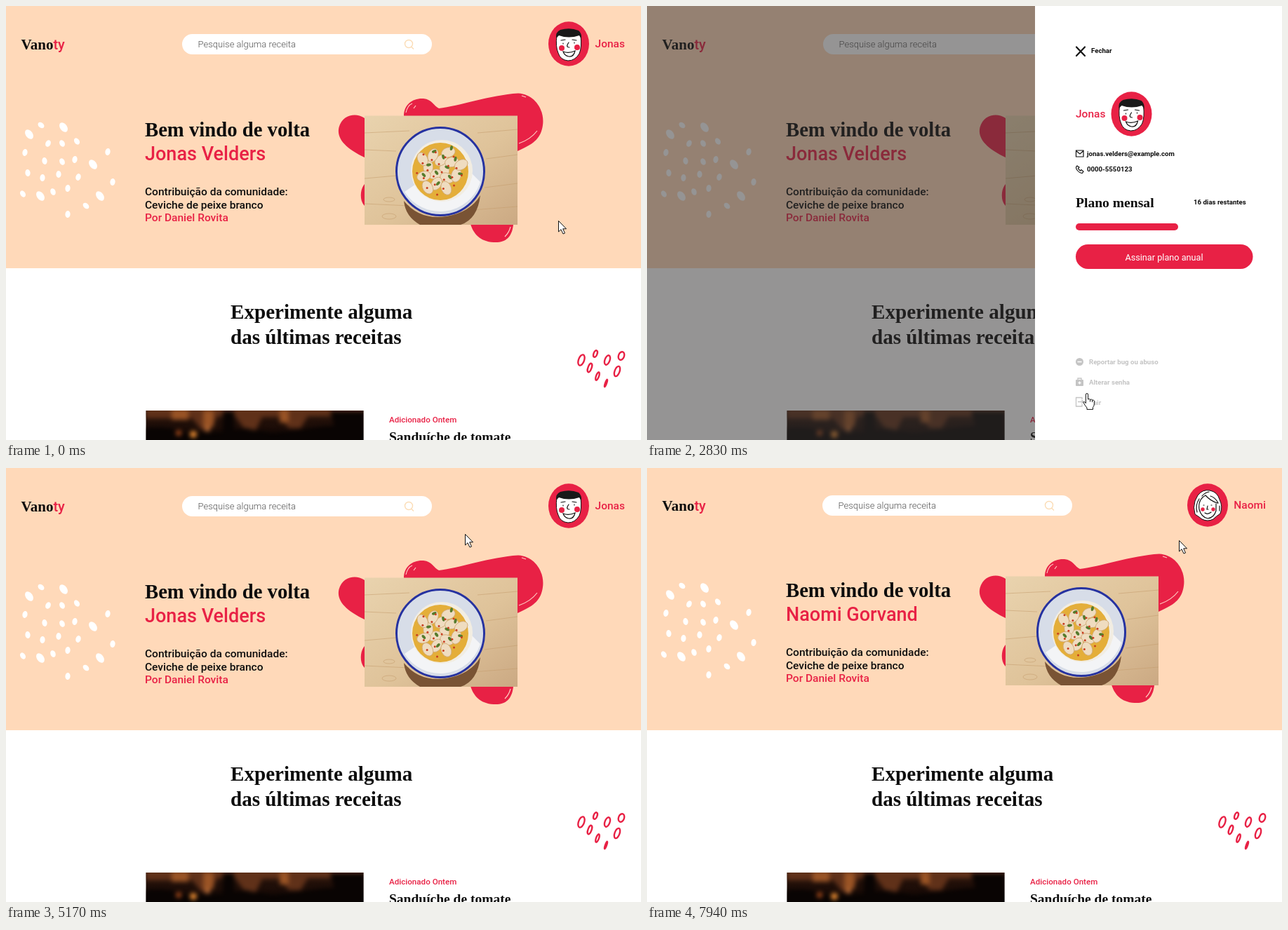
Animation of 905 by 619 pixels, one loop 8 s. Source, as an HTML page:

```html
<!DOCTYPE html>
<html lang="pt">
<head>
<meta charset="utf-8">
<style>
  html, body { margin: 0; width: 100%; height: 100%; overflow: hidden; background: #fff }
  svg { display: block; font-family: Roboto, sans-serif; font-weight: 500; fill: #0d0d0d }
  .serif { font-family: "Liberation Serif", serif; font-weight: 700 }
  .red { fill: #e82145 }
  .body { font-size: 15.5px }
  .small { font-size: 9.65px; font-weight: 700 }
  .line { fill: none; stroke: #111; stroke-width: 1.2; stroke-linecap: round }
</style>
</head>
<body>
<svg width="905" height="619" viewBox="0 0 905 619">
  <defs>
    <g id="man">
      <ellipse class="red" rx="29" ry="31.7"/>
      <path fill="#fff" stroke="#111" d="M-17-12Q0-18 17-12Q19 5 15 14Q9 24-1 24Q-12 23-15 13Q-19 4-17-12Z"/>
      <path fill="#191919" d="M-18-8Q-19-17-12-20Q2-24 14-19Q19-15 18-7L15-12Q0-7-14-12Z"/>
      <g class="red"><circle cx="-10" cy="6" r="4"/><circle cx="12" cy="5" r="4"/></g>
      <path class="line" d="M-11-5L-5-6M5-6L11-5M-8-1V0M8-2V-1M0-2Q-5 5 1 5M-8 11Q0 14 9 10Q7 19 0 18Q-6 17-8 11Z"/>
    </g>
    <g id="woman">
      <ellipse class="red" rx="29" ry="30.7"/>
      <path fill="#fff" stroke="#111" d="M-14-14Q-7-23 3-21Q14-19 17-8Q22 2 18 12Q12 16 8 20Q0 24-8 20Q-13 16-18 13Q-21 3-18-6Z"/>
      <path class="line" stroke-width=".9" d="M-12 6Q-14-8-3-14Q4-6 14-3M12-2V8Q9 18 0 19Q-9 17-12 6M-15 10Q-18 0-12-9M-8-13Q-4-18 2-19M4-13Q11-11 15-3M17 8V1M-6 0H-5M5 0H6M0 1L-1 6H1M-4 11Q0 14 5 10"/>
      <g class="red"><circle cx="-7" cy="6" r="2.7"/><circle cx="8" cy="6" r="2.7"/></g>
    </g>
    <linearGradient id="wood" x2="1" y2="1">
      <stop stop-color="#e9d3ae"/><stop offset=".55" stop-color="#dfc39a"/><stop offset="1" stop-color="#cba983"/>
    </linearGradient>
    <linearGradient id="night" x2="0" y2="1">
      <stop stop-color="#2b150c"/><stop offset=".6" stop-color="#1b0c07"/><stop offset="1" stop-color="#050202"/>
    </linearGradient>
    <clipPath id="photoClip"><path d="M511 156.500H729V312H511Z"/></clipPath>
    <clipPath id="cardClip"><path d="M199.500 577H509.500V619H199.500Z"/></clipPath>
  </defs>

  <path fill="#ffd9b9" d="M0 0H905V374H0Z"/>

  <g id="header">
    <text class="serif" x="21.500" y="62" font-size="21">Vano<tspan class="red" font-family="Roboto, sans-serif" font-weight="500" font-size="20">ty</tspan></text>
    <g id="search">
      <rect x="251" y="40" width="356" height="29" rx="14.500" fill="#fff"/>
      <text x="273.500" y="59.300" font-size="13" font-weight="300" fill="#555">Pesquise alguma receita</text>
      <path fill="none" stroke="#fbdcb5" stroke-width="1.400" d="M568.500 54a5.500 5.500 0 1 0 11 0a5.500 5.500 0 1 0-11 0M578 58.500L581 61.500"/>
    </g>
    <text id="shortName" class="red body" x="882" y="59.300" text-anchor="end"></text>
  </g>
  <use id="manTop" href="#man" x="802" y="54"/>
  <use id="womanTop" href="#woman" x="799" y="53"/>

  <g id="hero">
    <g id="dots" fill="#fff"></g>
    <text class="serif" x="198" y="186" font-size="28.700">Bem vindo de volta</text>
    <text id="fullName" class="red" x="198" y="219.500" font-size="27"></text>
    <g class="body">
      <text x="198" y="270">Contribuição da comunidade:</text>
      <text x="198" y="288.500">Ceviche de peixe branco</text>
      <text x="198" y="307" class="red">Por Daniel Rovita</text>
    </g>
    <path class="red" d="M511 216C490 206 470 192 474.500 173C480 154 500 152 511 160L567 157C567 140 580 131 595 132C607 133 610 143 617 146C645 143 690 127 730 124.500C755 126 768 150 765 170C762 192 748 198 729 207V300L723 312C721 330 712 338 695 337C675 336 666 324 662 311L511 285C504 278 504 262 511 254Z"/>
    <path fill="none" stroke="#ffc9c0" stroke-width="1.200" d="M570 152Q572 142 579 139M581 146L584 142M731 196Q748 190 757 178M735 128L741 130M711 329Q717 323 719 315"/>
    <g clip-path="url(#photoClip)">
      <path fill="url(#wood)" d="M511 156H729V312H511Z"/>
      <g fill="none" stroke="#c39c6c" stroke-opacity=".55">
        <path d="M511 181L575 178M672 181L729 176M511 205L556 207M684 218L729 212M511 246L556 242M682 259L729 253M511 282L575 285M664 291L729 286"/>
        <ellipse cx="546" cy="276" rx="8" ry="3"/><ellipse cx="546" cy="300" rx="10" ry="4"/>
      </g>
      <path fill="#795334" d="M567 278Q590 306 628 300Q662 294 676 270Q672 304 648 312H590Q569 300 567 278Z"/>
      <circle cx="619" cy="236" r="62.500" fill="#d7dde8" stroke="#2632a0" stroke-width="3"/>
      <path fill="#f3f4f6" d="M568 265A60 60 0 0 0 676 251L664 239A44 44 0 0 1 584 254Z"/>
      <circle cx="621" cy="235" r="44" fill="#f2ede2"/>
      <ellipse cx="619" cy="236" rx="40" ry="41" fill="#e4ae39"/>
      <g id="food"></g>
    </g>
  </g>

  <g class="serif" font-size="29.100">
    <text x="320" y="446">Experimente alguma</text>
    <text x="320" y="482">das últimas receitas</text>
  </g>
  <g id="rings" fill="none" stroke="#e82145"></g>

  <g clip-path="url(#cardClip)">
    <path fill="url(#night)" d="M199 577H510V619H199Z"/>
    <g style="filter: blur(3px)">
      <path fill="#603119" d="M199 572H510V585H430L420 602H403L390 586H365L356 605H341L327 585H301L291 604H278L266 588H199Z"/>
      <path fill="#9a5425" d="M236 576H260V590H236ZM281 577H296V600H281ZM390 576H403V594H390Z"/>
      <path fill="#090403" d="M199 602Q240 598 258 613L310 609L342 602L380 611L450 600L510 596V625H199ZM309 578H325V617H309ZM462 578H510V610H471Z"/>
      <circle cx="267" cy="611" r="5" fill="#e98b32"/><circle cx="246" cy="609" r="4" fill="#a64a1b"/><circle cx="287" cy="603" r="4" fill="#b66b37"/>
    </g>
  </g>
  <text class="red" x="546" y="594" font-size="11.600">Adicionado Ontem</text>
  <text class="serif" x="546" y="620.500" font-size="19.500">Sanduíche de tomate</text>

  <g id="panel">
    <path fill="#343232" fill-opacity=".52" d="M0 0H553V619H0Z"/>
    <path fill="#fff" d="M553 0H905V619H553Z"/>
    <path class="line" style="stroke-width: 2.200" d="M612 58.500L624 71M624 58.500L612 71"/>
    <text class="red body" x="611" y="159.300">Jonas</text>
    <use href="#man" x="690.500" y="154"/>
    <path class="line" d="M611.500 206H622V215H611.500ZM612 207L617 211L621.500 207M613 228Q610 230 613 234Q616 238 620 238.500L622 236L619 233.500L617.500 235Q615 233 614.500 231.500L616 230Z"/>
    <g class="small">
      <text x="633" y="67.300">Fechar</text>
      <text x="627" y="214">jonas.velders@example.com</text>
      <text x="627" y="236">0000-5550123</text>
      <text x="779" y="283">16 dias restantes</text>
      <g fill="#c4c4c4">
        <text x="630" y="511.300">Reportar bug ou abuso</text>
        <text x="630" y="539.800">Alterar senha</text>
        <text x="630" y="568.500">Sair</text>
        <circle cx="616.500" cy="507.500" r="5.500"/>
        <rect x="611" y="533" width="11" height="9" rx="1"/>
        <path fill="none" stroke="#c4c4c4" stroke-width="1.300" d="M614 533V531H619V533M620 561V558.500H611.500V571H620V568M614 564.500H622M619.500 562L622 564.500L619.500 567"/>
        <path stroke="#fff" stroke-width="1.500" d="M613.500 507.500H619.500M614.500 537.500H618.500M616.500 535.500V539.500"/>
      </g>
    </g>
    <text class="serif" x="611" y="286.500" font-size="19.600">Plano mensal</text>
    <rect class="red" x="611" y="310" width="146" height="10" rx="5"/>
    <rect class="red" x="611" y="340" width="252.500" height="35" rx="17.500"/>
    <text x="737" y="362.500" font-size="12.700" font-weight="400" fill="#fff" text-anchor="middle">Assinar plano anual</text>
  </g>

  <g id="cursor" fill="#fff" stroke="#111" stroke-linejoin="round">
    <path id="arrow" d="M.500.500V16L4 12.700L7 19L9.500 18L6.700 11.800H11.500Z"/>
    <path id="hand" d="M-1.600 14.500V2.200Q-1.600.600 0 .600T1.600 2.200V9Q3.300 7.500 4.600 9.300Q6.300 8.300 7.600 10Q9.300 9.300 10.400 11.200V16Q10 19 8.500 20.500V23.400H0V21Q-2.500 18.500-5 13.500Q-4.500 11-1.600 14.500ZM4.600 9.300V12.500M7.600 10V13"/>
  </g>
</svg>
<script>
const $ = id => document.getElementById(id);
const LOOP = 8000;

let seed = 7;
const rand = () => (seed = seed * 16807 % 2147483647) / 2147483647;
const ellipse = (x, y, rx, ry, turn, extra = '') =>
  `<ellipse rx="${rx}" ry="${ry}" transform="translate(${x} ${y}) rotate(${turn})" ${extra}/>`;

const dots = [[33, 183], [50, 170], [82, 173], [60, 196], [80, 196], [101, 193], [27, 209], [55, 221],
  [80, 222], [98, 219], [124, 226], [145, 208], [31, 238], [52, 245], [75, 240], [103, 244],
  [24, 268], [49, 271], [67, 265], [88, 260], [152, 251], [134, 271], [114, 285], [88, 297]];
const bigDots = [0, 2, 10, 17, 21];
$('dots').innerHTML = dots.map(([x, y], i) => bigDots.includes(i)
  ? ellipse(x, y, 5, 7.5, -35) : ellipse(x, y, 3.6, 5, rand() * 80 - 50)).join('');

$('rings').innerHTML = [[820, 505, 4, 8], [840, 496, 2.5, 5], [877, 499, 4, 6], [857, 505, 3.5, 7],
  [832, 516, 2.5, 6.5], [871, 521, 3.5, 7.5], [843, 528, 2, 6], [855, 538, 1, 5.5]]
  .map(([x, y, rx, ry]) => ellipse(x, y, rx, ry, 20, 'stroke-width="2.4"')).join('');

function scatter(count, radius, draw) {
  return Array.from({ length: count }, (_, i) => {
    const angle = i * 2.4, r = radius * Math.sqrt((i + .5) / count);
    return draw(619 + r * Math.cos(angle), 233 + r * Math.sin(angle));
  }).join('');
}
$('food').innerHTML =
  scatter(15, 32, (x, y) => ellipse(x, y, 10, 7, rand() * 180, 'fill="#efdcc0" stroke="#cfa873" stroke-width=".8"')) +
  scatter(11, 31, (x, y) => ellipse(x + 3, y - 3, 3.5, 2, rand() * 180, 'fill="#557b2c"')) +
  scatter(22, 34, (x, y) => ellipse(x - 3, y + 4, 1.5, 1.5, 0, 'fill="#c83d20"'));

const users = [
  { short: 'Jonas', full: 'Jonas Velders', header: [0, 0], search: 0, hero: 0 },
  { short: '', full: 'Camila Montedrook', header: [0, -17], search: 55, hero: -34 },
  { short: 'Naomi', full: 'Naomi Gorvand', header: [0, -1], search: -1, hero: -2 },
];

// Each move: start, last step, then start, control and end points of the pointer.
const moves = [
  [120, 870, [787, 306], [845, 190], [807, 64]],
  [1500, 2230, [807, 64], [735, 215], [658, 369]],
  [2350, 3070, [658, 369], [648, 660], [623, 534]],
  [3190, 3920, [623, 534], [609, 300], [623, 64]],
  [4560, 5290, [623, 64], [640, 82], [655, 95]],
  [6560, 6560, [655, 95], [657, 101], [657, 101]],
  [7210, 7940, [657, 101], [708, 138], [758, 103]],
];
const STEPS = 7;

function pointerAt(t) {
  const [start, end, a, b, c] = moves.findLast(m => t >= m[0]) || moves[0];
  if (t < start) return a;
  const step = end > start ? Math.floor((t - start) / (end - start) * (STEPS - 1) + 1e-6) + 1 : STEPS;
  const u = Math.min(step, STEPS) / STEPS;
  const s = 1 - (1 - u) ** 2;
  return a.map((v, i) => Math.round((1 - s) ** 2 * v + 2 * s * (1 - s) * b[i] + s * s * c[i]));
}

function isLink([x, y], t) {
  const inside = (l, top, r, bottom) => x >= l && x <= r && y >= top && y <= bottom;
  // The pointer keeps its shape until it moves after the panel toggles.
  if (t < 1500 || t >= 4560) return inside(773, 22, 882, 86);
  return t < 1500 || inside(611, 55, 663, 75) || inside(611, 340, 863, 375) || inside(611, 500, 730, 575);
}

const show = (id, on) => $(id).style.display = on ? '' : 'none';
const shift = (id, x, y) => $(id).setAttribute('transform', `translate(${x} ${y})`);

function draw(now) {
  const t = now % LOOP;
  const index = t < 6560 ? 0 : t < 6800 ? 1 : 2;
  const user = users[index];
  $('shortName').textContent = user.short;
  $('fullName').textContent = user.full;
  shift('header', ...user.header);
  shift('search', user.search, 0);
  shift('hero', 0, user.hero);
  show('manTop', index === 0);
  show('womanTop', index === 2);
  show('panel', t >= 1130 && t < 4170);

  const point = pointerAt(t), link = isLink(point, t);
  shift('cursor', ...point);
  show('hand', link);
  show('arrow', !link);
  requestAnimationFrame(draw);
}
draw(performance.now());
</script>
</body>
</html>
```
